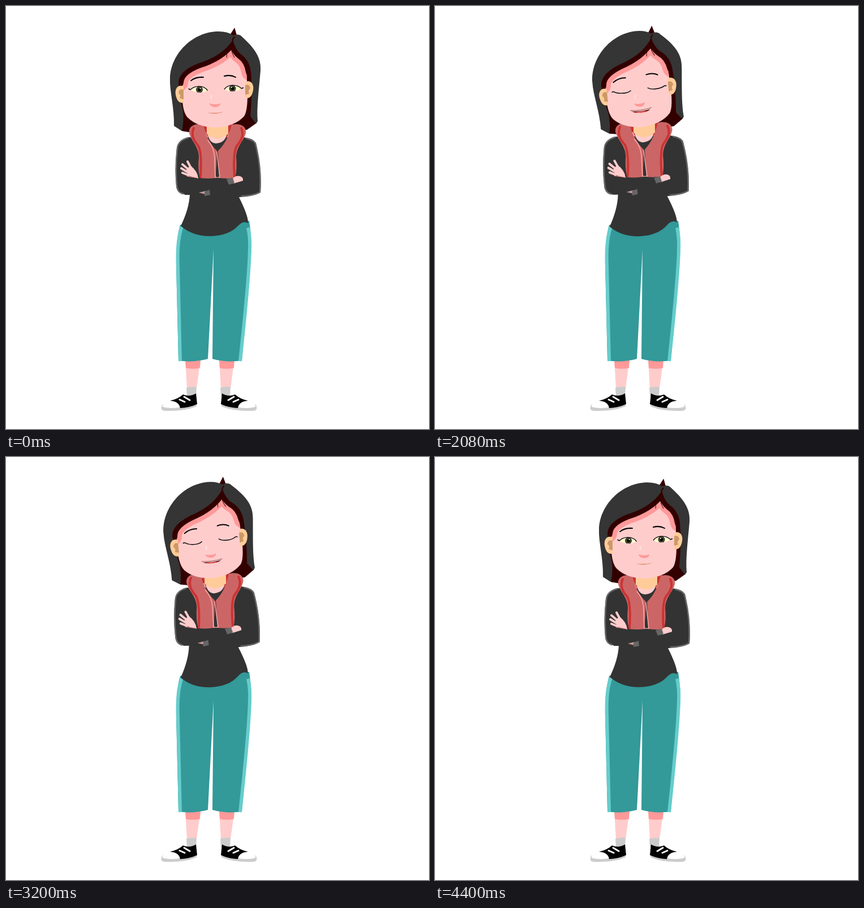
An HTML page that plays this animation: 748 by 748 pixels, repeating every 4800 ms.

```html
<!DOCTYPE html>
<html lang="en">
<head>
<meta charset="utf-8">
<title>Woman with folded arms</title>
<style>
html, body { margin: 0; width: 100%; height: 100%; overflow: hidden; background: #fff; }
svg { display: block; width: 100vw; height: 100vh; }
.line { fill: none; stroke-linecap: round; }
.head {
  transform-origin: 369px 151.5px;
  transform: translate(calc(var(--turn) * -16.5px), calc(var(--turn) * -1px)) rotate(calc(var(--turn) * -9.3deg));
}
.torso {
  transform-origin: 368px 398px;
  transform: rotate(calc(var(--turn) * -2.1deg)) scale(1, calc(1 + var(--turn) * .02));
}
.front { transform: translate(calc(var(--turn) * -1.5px), calc(var(--turn) * -1.3px)); }
.brows { transform: translateY(calc(var(--blink) * 2px - var(--turn) * 4px)); }
.closed { opacity: calc(1 - var(--smile) * 100); }
.open {
  opacity: calc(var(--smile) * 100);
  transform-origin: 370px 184px;
  transform: scale(calc(.65 + var(--smile) * .35), var(--smile));
}
</style>
</head>
<body>
<svg viewBox="0 0 748 748">
  <defs>
    <path id="face" d="M313 130C310 165 312 187 321 197Q338 214 370 215Q405 213 421 195Q428 185 427 145L424 100L398 60L316 110Z"/>
    <path id="fringe" d="M305 135Q306 112 350 98Q385 85 401 60Q406 78 415 85Q430 95 433 116"/>
    <path id="mouth" d="M348 185Q372 192 394 180Q390 201 370 201Q354 201 348 185Z"/>
    <clipPath id="inFace"><use href="#face"/></clipPath>
    <clipPath id="inMouth"><use href="#mouth"/></clipPath>
    <clipPath id="inEye"><path class="eye"/></clipPath>

    <g id="leg">
      <path fill="#fcc" d="M317 625H344L337 676H320Z"/>
      <path fill="#f99" d="M317 625H344L343 640Q330 643 318 640Z"/>
      <path fill="#ccc" d="M319 675Q328 672 337 674L336 690H320Z"/>
    </g>
    <g id="shoe">
      <path fill="#ccc" d="M277 704Q270 716 283 716Q315 717 337 708V700Z"/>
      <path fill="#fff" d="M277 705Q285 696 299 697L311 709Q292 713 277 709Z"/>
      <path d="M290 698Q304 695 313 687Q325 692 336 685L338 704Q325 710 308 711Q306 699 290 698Z"/>
      <path class="line" stroke="#fff" stroke-width="3" d="M307 696L316 700M315 691L325 697"/>
    </g>
    <g id="lobe">
      <path fill="#c66" d="M349 210C330 206 322 216 324 225C328 240 341 248 341 268Q339 290 343 304Q357 306 371 304L373 256Q356 240 349 210Z"/>
      <path class="line" stroke="#c33" stroke-width="4" d="M332 216Q325 230 339 246Q347 256 344 302"/>
    </g>
    <g id="ear">
      <path fill="#fc9" d="M314 142C304 138 298 146 300 157Q303 173 314 171Z"/>
      <path fill="#c96" d="M314 148Q306 145 305 154Q310 157 307 163L314 165Z"/>
    </g>
    <g id="look">
      <path class="eye" fill="#ffc"/>
      <g clip-path="url(#inEye)">
        <circle r="6" fill="#333"/>
        <circle r="4" fill="#663"/>
        <circle r="3"/>
        <circle cx="1.500" cy="-2" r="1" fill="#fff"/>
      </g>
      <path class="lid line" stroke="#000" stroke-width="1.400"/>
    </g>
  </defs>

  <!-- legs and trousers -->
  <use href="#leg"/>
  <use href="#leg" x="60"/>
  <use href="#shoe"/>
  <use href="#shoe" transform="matrix(-1 0 0 1 718 0)"/>
  <path fill="#399" d="M308 387Q300 415 301 460L305 627Q330 631 357 624L367 430L365 624Q390 631 417 627L434 430Q434 405 430 380Z"/>
  <path class="line" stroke="#6cc" stroke-width="6" style="stroke-linecap: butt" d="M311 390Q302 415 304 460L308 628M428 392Q432 410 431 430Q430 480 414 628"/>

  <g class="head">
    <path fill="#300" d="M305 110L311 221L323 223L426 219L443 207L435 110L400 62Z"/>
  </g>

  <g class="torso">
    <path fill="#333" d="M324 232Q303 238 302 252Q298 285 301 318Q302 335 325 333Q324 358 309 389Q330 407 361 407Q395 406 411 388Q420 379 428 384Q429 372 412 338Q436 337 450 330Q453 290 442 242Q436 234 420 232Z"/>
    <path class="line" stroke="#666" stroke-width="2.500" d="M322 233Q304 238 303 252Q299 285 302 317Q303 330 313 332M425 234Q439 237 441 244Q452 285 449 329Q440 335 417 336"/>

    <path fill="#c33" d="M346 209H402L391 232H357Z"/>
    <path fill="#fcc" d="M357 228H390Q387 242 371 243Q360 242 357 228Z"/>
    <path fill="#fc9" d="M355 205H393V226Q373 242 355 226Z"/>

    <g class="front">
      <use href="#lobe"/>
      <use href="#lobe" transform="matrix(-1 0 0 1 748 0)"/>
      <path class="line" stroke="#f9a9a9" stroke-width="1.500" d="M357 238Q370 252 369 275L370 303H378L373 258"/>
      <path fill="#333" d="M373 275Q378 302 374 303Q369 302 373 275Z"/>

      <path fill="#333" d="M316 303Q350 309 394 305L402 315Q380 320 360 326L355 334H316Z"/>
      <path fill="#fcc" d="M322 300L319 289L326 282Q339 292 340 305Z"/>
      <path class="line" stroke="#fcc" stroke-width="4" d="M329 290L321 275M325 291L312 280M323 295L310 287M322 299L312 295"/>
      <path class="line" stroke="#f99" d="M320 301L340 304"/>
      <path fill="#fcc" d="M400 306Q406 299 414 301Q420 303 419 309L402 314Z"/>
      <path fill="#666" d="M390 306L401 304L404 313L394 316Z"/>
      <path fill="#c99" d="M341 330L353 327V333Z"/>
      <path fill="#666" d="M351 328L360 325L361 334L351 336Z"/>
    </g>
  </g>

  <g class="head">
    <use href="#face" fill="#fcc"/>
    <g clip-path="url(#inFace)" class="line">
      <use href="#fringe" stroke="#f99" stroke-width="34"/>
    </g>
    <use href="#fringe" class="line" stroke="#300" stroke-width="18"/>
    <path class="line" stroke="#300" d="M398 70Q390 79 390 91M398 70Q398 82 404 91"/>
    <path fill="#353535" d="M311 221L297 212C298 180 289 150 290 128C291 85 330 45 376 45Q392 45 402 52Q412 48 418 55C440 75 452 92 450 115C447 150 443 180 445 204L442 208L432 195Q436 150 433 116Q430 95 415 85Q406 78 401 60Q385 85 350 98Q306 112 305 135Q307 165 313 185Q315 205 311 221Z"/>
    <path class="line" stroke="#300" stroke-width="2" d="M404 55Q400 57 401 64"/>
    <use href="#ear"/>
    <use href="#ear" transform="matrix(-1 0 0 1 737 -8)"/>

    <use href="#look" transform="translate(342 148)"/>
    <use href="#look" transform="translate(400.500 146) scale(-1 1)"/>
    <path class="brows line" stroke="#000" stroke-width="2" d="M327 132Q336 125 349 126M386 124Q397 121 406 126"/>

    <path fill="#f99" d="M360 172Q370 176 379 172Q379 178 370 179Q361 178 360 172Z"/>
    <path class="line" stroke="#ffe5e0" stroke-width="2" d="M363 158V163"/>
    <path class="line" stroke="#f9a9a9" stroke-width="1.400" d="M348 158h0M353 161h0M386 160h0M391 156h0"/>

    <path class="closed" fill="#c63" d="M355 188Q370 191 385 187Q371 193 355 188Z"/>
    <g class="open">
      <use href="#mouth" fill="#600"/>
      <g clip-path="url(#inMouth)">
        <ellipse cx="371" cy="202" rx="18" ry="8" fill="#f66"/>
        <path class="line" stroke="#fff" stroke-width="9" d="M350 185Q372 192 392 181"/>
      </g>
      <path class="line" stroke="#600" stroke-width="1.200" d="M347 183L348 185Q372 192 394 180L395 178"/>
    </g>
  </g>
</svg>
<script>
const LOOP = 4800, STEP = 40, BLINK = 340;
const svg = document.querySelector("svg");
const eyes = svg.querySelectorAll(".eye"), lids = svg.querySelectorAll(".lid");

const ramp = (t, from, to) => Math.min(1, Math.max(0, (t - from) / (to - from)));
const bump = (t, start) => Math.min(1, 1.2 * Math.sin(Math.PI * ramp(t, start, start + BLINK)));

function draw(now) {
  const t = Math.floor((now % LOOP) / STEP + 0.01) * STEP;
  const turn = ramp(t, 1840, 2320) ** 0.75 * (1 - ramp(t, 3000, 3480));
  const smile = ramp(t, 1960, 2320) * (1 - ramp(t, 3000, 3280));
  const blink = Math.max(...[0, 1840, 3060, 4040].map(start => bump(t, start)));
  for (const [name, value] of Object.entries({ turn, smile, blink }))
    svg.style.setProperty("--" + name, value.toFixed(4));

  const y = -8 + 14 * blink;
  const arc = `C-8 ${y} 8 ${y} 14 1`;
  eyes.forEach(eye => eye.setAttribute("d", `M-16 0${arc}C9 6 -7 7 -16 0Z`));
  lids.forEach(lid => lid.setAttribute("d", `M-19 ${2 * blink - 1.5}L-16 0${arc}`));
}

function frame() {
  draw(performance.now());
  requestAnimationFrame(frame);
}
frame();
</script>
</body>
</html>
```
